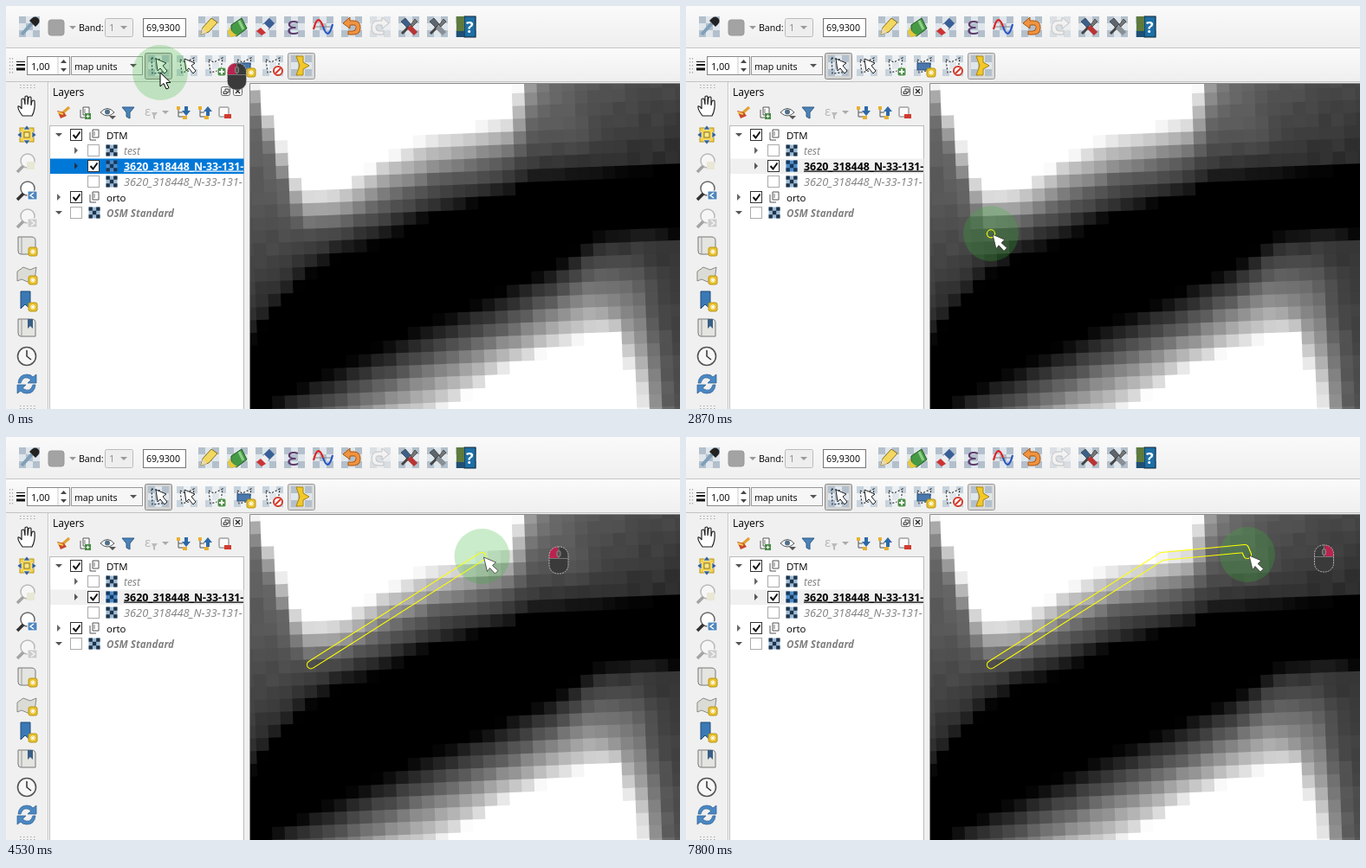
Write an HTML page with a canvas that moves like this. It is 778 px wide and 466 px high and loops after 8 s.

```html
<!DOCTYPE html>
<html lang="en">
<head>
<meta charset="utf-8">
<title>Raster editing</title>
<style>
html, body { margin: 0; width: 100%; height: 100%; overflow: hidden; background: #f0f0f0; }
canvas, svg { position: absolute; left: 0; top: 0; display: block; }
text { font-family: "Open Sans", "Noto Sans", sans-serif; white-space: pre; }
</style>
</head>
<body>
<canvas id="map" width="778" height="466"></canvas>
<svg id="ui" width="778" height="466" viewBox="0 0 778 466"></svg>
<svg id="over" width="778" height="466" viewBox="0 0 778 466">
  <mask id="hollow" maskUnits="userSpaceOnUse" x="0" y="0" width="778" height="466">
    <rect width="778" height="466" fill="#fff"/>
    <path class="band" fill="none" stroke="#000" stroke-width="8" stroke-linecap="round" stroke-linejoin="round"/>
  </mask>
  <g id="pointer">
    <circle r="32" fill="rgba(50,180,50,.26)"/>
  </g>
  <g mask="url(#hollow)">
    <path class="band" fill="none" stroke="#ff0" stroke-width="10.2" stroke-linecap="round" stroke-linejoin="round"/>
  </g>
  <g id="cursor">
    <path id="arrow" d="M0 0v16l4-3.5 3 6.5 3-1.3-3-6.2h5z" fill="#fff" stroke="#000"/>
    <path id="pick" d="M2 1L16 7l-4 3.500 6.500 6-3.500 3.500-6-6.500-3 4z" fill="#fff" stroke="#333" stroke-width=".8"/>
  </g>
  <g id="mouse">
    <rect x="-11" y="-15.5" width="22" height="31" rx="10" fill="#3a3a3a"/>
    <path id="button" d="M-1-15.5Q-11-15-11-5V-2H-1z" fill="#b8244f"/>
    <rect x="-11" y="-15.5" width="22" height="31" rx="10" fill="none" stroke="#bbb" stroke-dasharray="2 1"/>
    <path d="M-11-2H11M0-15V-2" stroke="#777" fill="none"/>
    <rect x="-2" y="-11" width="4" height="7" rx="2" fill="#555" stroke="#aaa" stroke-width=".7"/>
  </g>
</svg>
<script>
const $ = id => document.getElementById(id);

// ---- terrain: contour heights y(x) for falling and rising grey levels ----
const topX = [282, 300, 341, 386, 430, 485, 583, 597, 612, 778];
const upper = [
  [255, 80, 118, 212, 210, 181, 150, 130, 60, 40, -400],
  [205, 88, 128, 224, 222, 192, 165, 140, 96, 50, -300],
  [150, 96, 142, 240, 238, 211, 186, 156, 130, 70, -220],
  [100, 130, 165, 255, 252, 229, 203, 173, 160, 125, -60],
  [70, 310, 290, 271, 265, 247, 221, 190, 180, 172, 90],
  [45, 365, 345, 298, 274, 258, 233, 205, 196, 190, 178],
  [0, 395, 365, 322, 290, 276, 246, 217, 210, 206, 188]];
const lowX = [282, 430, 500, 570, 640, 680, 706, 735, 778];
const lower = [
  [0, 468, 393, 360, 330, 295, 264, 257, 257, 260],
  [50, 487, 418, 384, 352, 314, 284, 277, 271, 279],
  [95, 519, 439, 407, 375, 337, 309, 313, 318, 520],
  [150, 542, 464, 430, 396, 362, 342, 356, 396, 600],
  [210, 564, 491, 459, 417, 385, 371, 374, 437, 680],
  [255, 580, 506, 472, 425, 393, 383, 382, 480, 780]];

function lerpAt(xs, ys, x) {
  let i = 1;
  while (i < xs.length - 1 && x > xs[i]) i++;
  const k = Math.min(1, Math.max(0, (x - xs[i - 1]) / (xs[i] - xs[i - 1])));
  return ys[i - 1] + (ys[i] - ys[i - 1]) * k;
}

function greyAt(x, y) {
  const at = (xs, rows) => lerpAt(rows.map(r => lerpAt(xs, r.slice(1), x)), rows.map(r => r[0]), y);
  const bump = 14 * Math.exp(-((x - 655) ** 2 + (y - 142) ** 2) / 900);
  const high = at(topX, upper);
  return high > 0 ? high + bump : at(lowX, lower);
}

function drawMap() {
  const c = $("map").getContext("2d"), w = 14.5, h = 14.75, tilt = 0.038;
  let seed = 7;
  const rnd = () => (seed = seed * 16807 % 2147483647) / 2147483647;
  c.beginPath();
  c.rect(282, 90, 496, 376);
  c.clip();
  c.fillRect(282, 90, 496, 376);
  c.translate(585, 130.5);
  c.rotate(-tilt);
  for (let row = -5; row < 26; row++) for (let col = -24; col < 16; col++) {
    const u = (col + .5) * w, v = (row + .5) * h;
    const x = 585 + u * Math.cos(tilt) + v * Math.sin(tilt);
    const y = 130.5 - u * Math.sin(tilt) + v * Math.cos(tilt);
    let g = greyAt(x, y);
    const n = rnd() - .5;
    if (g > 8 && g < 245) g += n * 9;
    g = Math.round(g);
    c.fillStyle = `rgb(${g},${g},${g})`;
    c.fillRect(col * w, row * h, w + 1, h + 1);
  }
}

// ---- interface ----
const path = (d, fill = "none", stroke = "none", w = 1, more = "") =>
  `<path d="${d}" fill="${fill}" stroke="${stroke}" stroke-width="${w}" ${more}/>`;
const box = (x, y, w, h, fill, stroke = "none", r = 0) =>
  `<rect x="${x}" y="${y}" width="${w}" height="${h}" rx="${r}" fill="${fill}" stroke="${stroke}"/>`;
const dot = (x, y, r, fill, stroke = "none", w = 1) =>
  `<circle cx="${x}" cy="${y}" r="${r}" fill="${fill}" stroke="${stroke}" stroke-width="${w}"/>`;
const label = (x, y, size, s, more = "") => `<text x="${x}" y="${y}" font-size="${size}" ${more}>${s}</text>`;
const at = (x, y, s) => `<g transform="translate(${x} ${y})">${s}</g>`;
const faint = s => `<g opacity=".4">${s}</g>`;

function checker(size, n, dark, light) {
  const s = size / n;
  let d = "";
  for (let i = 0; i < n * n; i++) {
    const r = Math.floor(i / n), c = i % n;
    if ((r + c) % 2 == 0) d += `M${c * s - size / 2} ${r * s - size / 2}h${s}v${s}h${-s}z`;
  }
  return box(-size / 2, -size / 2, size, size, light) + path(d, dark);
}
const tile = checker(24, 3, "#b3c0cc", "#dfe6ec");
const layerIcon = checker(13, 3, "#1f3348", "#9dbbd6");
const star = at(7, 7, box(-5, -5, 10, 10, "#e8c22c", "#b8961a", 2) + path("M-3 0H3M0-3V3M-2-2l4 4M2-2l-4 4", "none", "#fff"));
const down = (c = "#555") => path("M-4-2h8l-4 4z", c);
const lens = dot(1, -2, 8, "#fff", "#666", 1.5) + path("M-4 4l-7 7", "none", "#333", 3.5);
const book = path("M-10-10h15q5 0 5 4v16H-7q-3 0-3-4z", "#e4e4e0", "#777") + path("M-6-10v20", "none", "#999");
const dashPoly = path("M-8-7L-2-4 8-9 6 5-6 8z", "rgba(255,255,255,.45)", "#333", 1.2, 'stroke-dasharray="2 2"');
const white = path("M-3-8L9-3 5 0l5 6-3 3-5-6-3 3z", "#fff", "#222", 1);
const plate = checker(24, 3, "#c6d2dc", "#edf1f4");
const wrench = (a, b) => path("M-8 8L0 0", "none", "#444", 3) + path("M0 0L8 8", "none", a, 6) +
  path("M-9-6l5-4 6 7-4 4z", b, "#333", .7) + path("M2-2l5-7 3 3-6 6z", "#777", "#333", .7);

const topIcons = [
  [27, path("M-9 9L3-4", "none", "#7fa0b8", 4) + path("M0-7l7 7 3-3q3-4 0-7t-7 0z", "#222")],
  [234, path("M-9 9l2-8L3-10l7 5L0 6z", "#f2d860", "#8a6d1b") + path("M-9 9l2-8 5 6z", "#ead9b0")],
  [267, path("M-7-2L5-10l6 12-12 9q-7-2-6-11z", "#469a45", "#235a24") + path("M-9 0q2 7 9 10l-8 2-3-5z", "#e6c83c") + path("M2-7l5 10", "none", "#8fd08a", 3)],
  [300, path("M0 0L7-7", "none", "#3a5f96", 9) + path("M-4 4L1-1", "none", "#eee", 8) + path("M-11 5l5-4 6 6-5 3z", "#c33")],
  [333, label(-9, 9, 30, "ε", 'fill="#5c3a6c"')],
  [366, path("M-11 0H11", "none", "#888") + path("M-11 3q5-20 11-3", "none", "#d22", 2.2) + path("M0 0q6 17 11-3", "none", "#2753c4", 2.2)],
  [399, path("M-10-4l8-7v4h4q8 0 8 8t-8 8h-6V5h5q4 0 4-4t-4-3h-3v4z", "#ef9340", "#a9520e")],
  [432, path("M10-4l-8-7v4h-4q-8 0-8 8t8 8h6V5h-5q-4 0-4-4t4-3h3v4z", "#eee", "#777")],
  [465, wrench("#b83434", "#3b5f8a")],
  [498, wrench("#888f95", "#5d666e")],
  [531, box(-2, -12, 13, 24, "#1c6fa5", "#123") + path("M-11-12h9v24h-9z", "#5e7a3c") + label(0, 7, 18, "?", 'fill="#fff" font-weight="bold"') + path("M-11 5h9v7h-9z", "#1f4f74")]
];

const toolIcons = [
  [176, path("M-8-9L2-7 4 8-7 9z", "none", "#26384a", 1.3, 'stroke-dasharray="2 2"') + white],
  [209, dashPoly + white],
  [242, dashPoly + box(2, 2, 10, 10, "#4f8f4b", "#fff", 2) + path("M4 7h6M7 4v6", "none", "#fff", 2)],
  [275, dashPoly + box(-8, -3, 15, 8, "#4b79ad", "#244a75") + at(1, 1, star)],
  [308, dashPoly + dot(6, 6, 5, "#fff", "#d43a2a", 2) + path("M3 9l6-6", "none", "#d43a2a", 2)],
  [341, path("M-6-11h8v7l7 4-7 4v7h-8l4-11z", "#f3c829", "#a8850f")]
];

const sideIcons = [
  [116, path("M-5 11q-6-8-5-11 2-1 4 3l0-11q2-2 3 0l1 6V-11q2-2 3 0V-2l1-8q2-2 3 0V-1l1-5q2-2 3 0 1 10-3 17z", "#fff", "#222", 1.2)],
  [149, box(-8, -8, 16, 16, "#f2d24a", "#b89618") + path("M0-11l4 5h-8zM0 11l4-5h-8zM-11 0l5-4v8zM11 0L6-4v8z", "#315f96", "#fff", .6) + box(-3, -3, 6, 6, "#fbe88a", "#8a7a30")],
  [181, faint(lens + box(0, -1, 9, 9, "#e0dcae"))],
  [213, lens + box(1, 1, 11, 10, "#4f86bd", "#fff", 1) + path("M8 3L4 6l4 3", "none", "#fff", 1.5)],
  [245, faint(lens + box(1, 1, 11, 10, "#999", "#fff", 1) + path("M5 3l4 3-4 3", "none", "#fff", 1.5))],
  [277, book + star],
  [310, path("M-11-3L-4-8 4-5 11-8 9 7 1 9-6 6-11 8z", "#dcdcd6", "#888") + star],
  [341, path("M-7-11H4V9L-2 4-7 9z", "#3a79b5", "#1d4a78") + star],
  [372, book + path("M1-10h6v11L4-2 1 1z", "#3a5f85")],
  [405, dot(0, 0, 10.5, "#f7f7f7", "#555", 1.6) + path("M0-7V0l5 4", "none", "#333", 1.5)],
  [437, path("M-10-1q1-10 10-10 5 0 7 3l4-3v10H1l4-4q-9-6-12 4zM10 1Q9 11 0 11q-5 0-7-3l-4 3V1h10L-5 5Q4 11 7 1z", "#4a88c4", "#2a5c90", .7)]
];

const sheets = path("M-5-3v9h7M-2-6h7v9h-7z", "#fff", "#555") + path("M0-4v5", "none", "#777");
const nodes = c => path("M-5-6v11h5M-5 0h5", "none", "#555") + box(-7, -7, 4, 4, "#e8b030") + box(0, 4, 5, 4, "#e8b030") + path(c, "#2d69a8");
const panelIcons = [
  [66, path("M-1 1L7-6", "none", "#e0a030", 3) + path("M-7-2L1 0 4 4-3 7z", "#c94a30") + path("M-6 0l6 2", "none", "#f0cc40", 2)],
  [91, sheets + box(0, 1, 7, 7, "#4b8c49") + path("M1.5 4.5h4M3.5 2.5v4", "none", "#fff")],
  [117, path("M-8 0Q0-9 8 0 0 8-8 0z", "#fff", "#555") + dot(0, -.5, 3, "#51708c") + at(6, 6, down())],
  [141, path("M-7-6H7L2 0v7l-4-2V0z", "#4b83b8", "#2d5b87")],
  [167, label(-7, 4, 15, "ε", 'fill="#b5b5b5"') + path("M1 0h7L5 4v4l-2-1V4z", "#bbb")],
  [184, down("#aaa")],
  [204, nodes("M2-7h4v5h3L4 4-1-2h3z")],
  [229, nodes("M2 4h4v-5h3L4-7-1-1h3z")],
  [252, box(-6, -6, 11, 11, "#fafafa", "#777", 1) + box(0, 2, 8, 5, "#d13b30")]
];

function check(x, y, on) {
  return box(x + .5, y - 6.5, 13, 13, "#fff", on ? "#333" : "#aaa") +
    (on ? path(`M${x + 3.5} ${y}l3 3.5 5-7`, "none", "#111", 2) : "");
}
const closed = (x, y, c = "#666") => path(`M${x - 2} ${y - 4}l4 4-4 4z`, c);
const opened = (x, y) => path(`M${x - 4} ${y - 2}h8l-4 4z`, "#555");
const grey = 'fill="#808080" font-style="italic"';
const clip = ' clip-path="url(#tree)"';
const code = "3620_318448_N-33-131-";

function activeRow(id, back, ink, arrow) {
  return `<g id="${id}">` + box(51, 176.5, 223.5, 17.5, back) + closed(81, 185, arrow) +
    check(94, 185, true) + at(122, 185, checker(13, 3, "#16385c", "#4f8cc9")) +
    label(136, 189.5, 12.4, code, `fill="${ink}" font-weight="bold" text-decoration="underline"` + clip) + "</g>";
}

function drawUi() {
  let s = '<clipPath id="tree"><rect x="51" y="139" width="223" height="327"/></clipPath>' +
    '<linearGradient id="bar" x2="0" y2="1"><stop stop-color="#fafafa"/><stop offset="1" stop-color="#efefef"/></linearGradient>';
  s += path("M0 0H778V90H282V466H0z", "#f0f0f0") + box(0, 0, 778, 48, "url(#bar)") + box(0, 50, 778, 37, "url(#bar)");
  s += path("M0 48.5H778M0 87.5H778M48.5 88V466", "none", "#c4c4c4") + path("M0 49.5H778M49.5 89V466", "none", "#fff");
  s += path("M281.5 466V89.5H778", "none", "#8a8a8a");

  for (const [x, body] of topIcons) s += at(x, 24, x == 432 ? faint(tile + body) : tile + body);
  s += box(49, 16, 18, 18, "#a3a3a3", "#999", 3) + at(77, 25, down("#999"));
  s += label(84, 29, 10.6, "Band:");
  s += box(114.5, 14.5, 32, 21, "#eee", "#bbb", 2) + label(119, 29, 11, "1", 'fill="#888"') + at(136, 25, down("#999"));
  s += box(158.5, 14.5, 49, 21, "#fff", "#777") + label(162, 29, 10.6, "69,9300");

  s += path("M4.5 60V80M7.5 60V80", "none", "#aaa", 1.2, 'stroke-dasharray="1.5 2.5"');
  s += path("M12 64.5H22", "none", "#111") + path("M12 68H22", "none", "#111", 2) + path("M12 73H22", "none", "#111", 3);
  s += box(24.5, 58.5, 49, 21, "#fff", "#888") + label(29, 73.5, 11, "1,00") + path("M60 59v20", "none", "#ccc");
  s += path("M63 66h7l-3.5-4zM63 72h7l-3.5 4z", "#444");
  s += box(75.5, 58.5, 82, 21, "#f6f6f6", "#999") + label(79, 73.5, 10.6, "map units") + at(147, 69, down());
  s += box(160.5, 54.5, 31, 30, "#d3d3d3", "#888", 2) + box(325.5, 54.5, 31, 30, "#d9d9d9", "#999", 2);
  for (const [x, body] of toolIcons) s += at(x, 69, (x == 176 || x == 341 ? tile : plate) + body);

  s += path("M16 91.5H35M16 94.5H35M16 462.5H35M16 465.5H35", "none", "#aaa", 1.2, 'stroke-dasharray="1.5 2.5"');
  for (const [y, body] of sideIcons) s += at(24, y, body);

  s += label(54, 103.5, 12, "Layers");
  s += box(248.5, 93.5, 10, 10, "#f7f7f7", "#666", 2) + path("M251 99h4v2.5h-4zM253 98v-2h4v4h-2", "none", "#333");
  s += box(262.5, 93.5, 10, 10, "#f7f7f7", "#666", 2) + path("M265 96l5 5M270 96l-5 5", "none", "#222", 1.3);
  for (const [x, body] of panelIcons) s += at(x, 123, body);

  s += box(50.5, 138.5, 224, 340, "#fff", "#b8bbbe");
  s += opened(61, 149) + check(74, 149, true) + at(102, 149, sheets) + label(116, 153.5, 11.4, "DTM");
  s += closed(81, 167) + check(94, 167) + at(122, 167, layerIcon) + label(136, 171.5, 12, "test", grey);
  s += activeRow("rowBlue", "#0078d7", "#fff", "#234") + activeRow("rowGrey", "#f0f0f0", "#000", "#555");
  s += check(94, 203) + at(122, 203, layerIcon) + label(136, 207.5, 12.8, code, grey + clip);
  s += closed(61, 221) + check(74, 221, true) + at(102, 221, sheets) + label(116, 225.5, 11.4, "orto");
  s += opened(61, 239) + check(74, 239) + at(102, 239, layerIcon) + label(116, 243.5, 11.6, "OSM Standard", grey + ' font-weight="bold"');
  $("ui").innerHTML = s;
}

// ---- motion, in ticks of 1/15 s ----
const LOOP = 8000, TICK = 1000 / 15;
const A = [178, 77], B = [352, 263.3], C = [549.5, 138], D = [645, 129], E = [648, 136];
// start tick, end tick, from, bend, to
const legs = [
  [11, 30, A, [265, 172], B],
  [46, 65, B, [515, 245], C],
  [80, 89, C, [598, 134], D],
  [107, 111, D, [647, 132], E]];
const clicks = [[0, 8], [36, 43], [68, 77], [92, 101], [117, 120]];

function pointAt(tick) {
  let p = A;
  for (const [t0, t1, a, m, b] of legs) {
    if (tick < t0) break;
    const k = Math.min(1, (tick - t0) / (t1 - t0)), e = 1 - (1 - k) ** 2;
    p = [0, 1].map(i => (1 - e) ** 2 * a[i] + 2 * e * (1 - e) * m[i] + e * e * b[i]);
  }
  return p;
}

const bands = document.querySelectorAll(".band");
const show = (id, on) => $(id).setAttribute("visibility", on ? "visible" : "hidden");
const move = (id, x, y) => $(id).setAttribute("transform", `translate(${x} ${y})`);

function render(ms) {
  const tick = Math.floor((ms % LOOP + 4) / TICK), [x, y] = pointAt(tick);
  move("pointer", x, y);
  move("cursor", x, y);
  show("arrow", x < 282);
  show("pick", x >= 282);

  show("mouse", clicks.some(c => tick >= c[0] && tick < c[1]));
  move("mouse", x + 88.5, y + 4.5);
  $("button").setAttribute("transform", tick >= 117 ? "scale(-1 1)" : "");

  show("rowBlue", tick < 36);
  show("rowGrey", tick >= 36);

  const pts = [];
  if (tick >= 43) pts.push(B);
  if (tick >= 77) pts.push(C);
  if (tick >= 101) pts.push(D);
  const d = pts.length ? "M" + [...pts, [x, y]].map(p => p.join(" ")).join("L") : "";
  bands.forEach(b => b.setAttribute("d", d));
}

drawMap();
drawUi();
const start = performance.now();
function loop() {
  render(performance.now() - start);
  requestAnimationFrame(loop);
}
loop();
</script>
</body>
</html>
```
